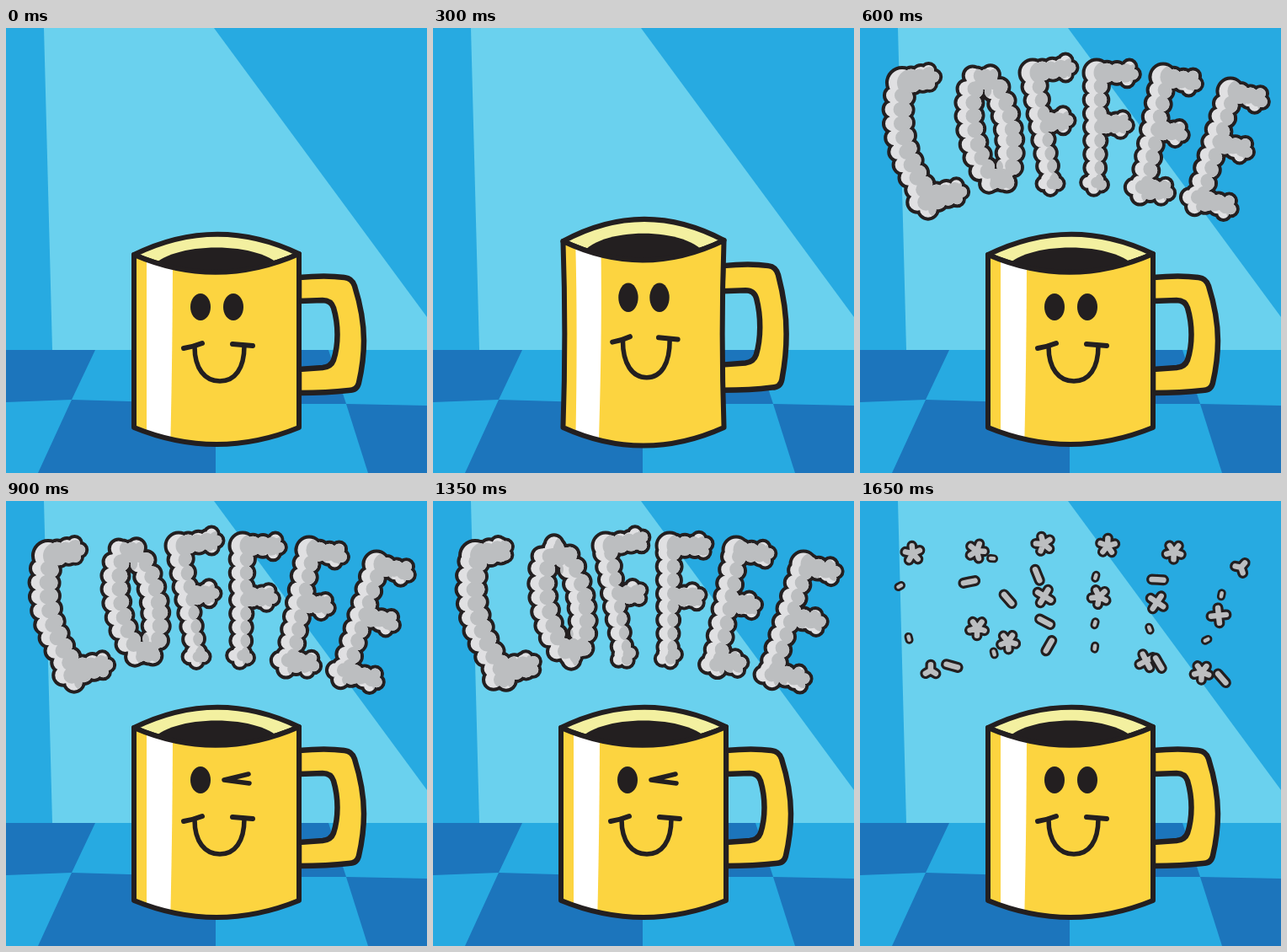
Write an HTML page with a canvas that moves like this. It is 500x528 px and loops after 1800 ms.

```html
<!DOCTYPE html>
<html lang="en">
<head>
<meta charset="utf-8">
<title>Coffee</title>
<style>
html, body { margin: 0; width: 100%; height: 100%; overflow: hidden; background: #27aae1; }
canvas { display: block; width: 500px; height: 528px; }
</style>
</head>
<body>
<canvas id="stage" width="500" height="528"></canvas>
<script>
const ctx = document.getElementById('stage').getContext('2d');
const INK = '#231f20', YELLOW = '#fcd440', CREAM = '#f3f0a0', WHITE = '#fff';
const SKY = '#27aae1', BEAM = '#6ad1ee', TILE = '#1c75bc';
const GREY = '#bcbec0', LIGHT = '#e0e0e2';
const STEP = 150, STEPS = 12, TAU = Math.PI * 2, MID = 0.47;

// Mug stretch: width, height, bulge of the sides
const REST = [1, 1, 0];
const bounce = [REST, [1.2, 0.85, 0.12], [0.975, 1.078, -0.03], [0.985, 1.04, -0.015]];

// Stems run from top to foot; arms leave them at right angles
const word = [
  { top: [50, 65], foot: [80, 202], bow: -32, fat: 16, taper: 0, arms: [30, 0, 33] },
  { ring: [154, 120], rx: 22, ry: 64, tilt: -0.17, fat: 14.5 },
  { top: [205, 53], foot: [226, 182], fat: 13.5, taper: 3, arms: [37, 24, 0] },
  { top: [281, 53], foot: [279, 182], fat: 13.5, taper: 3, arms: [35, 28, 0] },
  { top: [360, 58], foot: [336, 189], fat: 13.5, taper: 0, arms: [31, 26, 22] },
  { top: [440, 75], foot: [402, 202], fat: 13.5, taper: 0, arms: [31, 31, 32] }
];

const lerp = (a, b, t) => a + (b - a) * t;
const fill = (path, color) => { ctx.fillStyle = color; ctx.fill(path); };
const line = (path, width, color = INK) => {
  ctx.strokeStyle = color;
  ctx.lineWidth = width;
  ctx.stroke(path);
};

function poly(color, ...pts) {
  ctx.fillStyle = color;
  ctx.beginPath();
  for (let i = 0; i < pts.length; i += 2) ctx.lineTo(pts[i], pts[i + 1]);
  ctx.fill();
}

function room() {
  poly(SKY, 0, 0, 500, 0, 500, 528, 0, 528);
  poly(BEAM, 45, 0, 247, 0, 500, 343, 500, 382, 55, 382);
  poly(TILE, 0, 382, 106, 382, 78, 441, 0, 444);
  poly(TILE, 249, 382, 383, 382, 404, 446, 249, 446);
  poly(TILE, 78, 441, 249, 446, 249, 528, 38, 528);
  poly(TILE, 404, 446, 500, 448, 500, 528, 430, 528);
}

function cloud(circles, shift) {
  const path = new Path2D(), shade = new Path2D();
  for (const [x, y, r] of circles) {
    path.moveTo(x + r, y);
    path.arc(x, y, r, 0, TAU);
    shade.moveTo(x + shift + r, y);
    shade.arc(x + shift, y, r, 0, TAU);
  }
  line(path, 8);
  fill(path, LIGHT);
  ctx.save();
  ctx.clip(path);
  fill(shade, GREY);
  ctx.restore();
}

function stemAt({ top, foot, bow = 0 }, t) {
  return [lerp(top[0], foot[0], t) + 2 * t * (1 - t) * bow, lerp(top[1], foot[1], t)];
}

function ringAt({ ring: [x, y], rx, ry, tilt }, turn) {
  const u = Math.cos(turn * TAU) * rx, v = Math.sin(turn * TAU) * ry;
  return [x + u * Math.cos(tilt) - v * Math.sin(tilt), y + u * Math.sin(tilt) + v * Math.cos(tilt)];
}

const armAngle = ({ top, foot }) => Math.atan2(top[0] - foot[0], foot[1] - top[1]);
const armRoot = (l, i) => stemAt(l, [0, MID, 1][i]);
const along = ([x, y], angle, d) => [x + Math.cos(angle) * d, y + Math.sin(angle) * d];

// Round bumps on both sides of a curve
function bumps(at, from, to, gap, fat, phase) {
  const out = [], N = 120;
  let walked = -phase * gap, [px, py] = at(from);
  for (let i = 0; i <= N; i++) {
    const [x, y] = at(lerp(from, to, i / N));
    const dx = x - px, dy = y - py, len = Math.hypot(dx, dy);
    walked += len;
    [px, py] = [x, y];
    if (walked < 0 || !len) continue;
    walked -= gap;
    const h = fat(i / N), r = 9, off = (h - r) / len;
    out.push([x, y, h - 3], [x - dy * off, y + dx * off, r], [x + dy * off, y - dx * off, r]);
  }
  return out;
}

function knob(p, angle, r) {
  const tips = [-1.25, 0, 1.25].map(turn => [...along(p, angle + turn, r * 0.8), r * 0.62]);
  return [[...p, r], ...tips];
}

function letter(l, alt) {
  const phase = alt ? 0.5 : 0, gap = 16, sway = alt ? -0.35 : 0.15;
  if (l.ring) return cloud(bumps(t => ringAt(l, t), 0, 1, gap, () => l.fat, phase), 10);
  const angle = armAngle(l), fat = t => l.fat - l.taper * t;
  const circles = bumps(t => stemAt(l, t), 0, 1, gap, fat, phase);
  circles.push([...l.top, l.fat], ...knob(l.foot, angle + Math.PI / 2 + sway, fat(1)));
  l.arms.forEach((len, i) => {
    if (!len) return;
    const root = armRoot(l, i);
    circles.push(...bumps(t => along(root, angle, t * len), 0, 1, 12, () => l.fat - 2, phase));
    circles.push(...knob(along(root, angle, len), angle + sway, 10.5));
  });
  cloud(circles, 10);
}

function burst() {
  const circles = [];
  for (let i = 0; i < 14; i++) circles.push([...ringAt({ ring: [250, 152], rx: 128, ry: 36, tilt: 0 }, i / 14), 31]);
  for (let x = 150; x <= 350; x += 25) circles.push([x, 152, 36]);
  for (let y = 205; y < 265; y += 18) {
    for (const d of [-35, 0, 35]) circles.push([250 + d, y, d ? 20 : 26]);
  }
  cloud(circles, 12);
}

function puff([x, y], lobes, turn, scale) {
  const path = new Path2D(), reach = lobes > 3 ? 9 : lobes > 1 ? 7 : 4;
  for (let i = 0; i < lobes; i++) {
    const a = turn + i / lobes * TAU;
    path.moveTo(0, 0);
    path.lineTo(Math.cos(a) * reach, Math.sin(a) * reach);
  }
  ctx.save();
  ctx.translate(x, y);
  ctx.scale(scale, scale);
  line(path, lobes > 1 ? 13 : 10);
  line(path, lobes > 1 ? 6.5 : 4.5, GREY);
  ctx.restore();
}

// Large puffs stay where strokes met, small ones between them
function puffs(scale) {
  let seed = 7;
  const rand = () => (seed = seed * 16807 % 2147483647) / 2147483647;
  const big = p => puff(p, 3 + Math.floor(rand() * 3), rand() * TAU, scale);
  const small = p => puff(p, 1 + Math.floor(rand() * 2), rand() * TAU, scale);
  for (const l of word) {
    if (l.ring) {
      for (let i = 0; i < 7; i++) (i % 2 ? big : small)(ringAt(l, i / 7));
      continue;
    }
    const angle = armAngle(l);
    small(stemAt(l, 0.27));
    small(stemAt(l, 0.7));
    l.arms.forEach((len, i) => {
      if (len) big(along(armRoot(l, i), angle, i ? 4 : 13));
    });
    const low = l.arms[2];
    if (low) small(along(l.foot, angle, low - 3));
    else small(stemAt(l, 0.92));
  }
}

function mug([sx, sy, bulge], wink, steam) {
  const bend = y => sx + bulge * Math.sin(Math.PI * Math.min(1, Math.max(0, (474 - y) / 205)));
  // The handle keeps its width and rides on the side of the body
  const warp = (x, y) => {
    const over = Math.max(0, x - 348);
    return [250 + (x - over - 250) * bend(y) + over, 474 - (474 - y) * sy];
  };
  const shape = d => new Path2D(d.replace(/([\d.]+) ([\d.]+)/g, (_, x, y) => warp(+x, +y).join(' ')));

  const handle = shape('M348 296C368 294 388 294 402 296Q411 297 414 306C420 325 425 350 425 371' +
    'C425 390 422 408 419 421Q417 430 407 430C390 432 368 433 348 433' +
    'L348 405L376 403Q386 402 389 394C395 376 395 352 389 332Q386 323 376 323L348 324Z');
  fill(handle, YELLOW);
  line(handle, 6.5);

  const mouth = shape('M152 269Q250 221 348 268Q250 311 152 269Z');
  fill(mouth, CREAM);
  ctx.save();
  ctx.clip(mouth);
  fill(shape('M172 286C192 252 308 252 328 286L322 320L178 320Z'), INK);
  ctx.restore();
  line(mouth, 6);
  if (steam) burst();

  const body = shape('M152 269Q250 311 348 268C348 337 348 405 348 474Q250 514 152 474C152 405 152 337 152 269Z');
  fill(body, YELLOW);
  ctx.save();
  ctx.clip(body);
  fill(shape('M167 265L198 265C198 340 197 420 195 505L167 505C167 420 167 340 167 265Z'), WHITE);
  ctx.restore();
  line(body, 6);

  for (const x of wink ? [231] : [231, 270]) {
    const eye = new Path2D();
    eye.ellipse(...warp(x, 331), 12 * sx, 16 * sy, 0, 0, TAU);
    fill(eye, INK);
  }
  if (wink) line(shape('M288 324L259 331L289 335'), 5.5);
  line(shape('M224 378C224 404 236 419 254 419C272 419 283 404 283 377'), 5.5);
  line(shape('M211 380Q223 378 233 374M269 375L293 377'), 6);
}

function draw(step) {
  const text = step >= 4 && step < 10;
  ctx.lineJoin = ctx.lineCap = 'round';
  room();
  mug(bounce[step] || REST, step >= 6 && step < 10, step === 3);
  if (text) word.forEach(l => letter(l, step % 2 === 1));
  if (step === 10) puffs(1.45);
  if (step === 11) puffs(1);
}

const start = performance.now();
let shown = -1;
function tick() {
  const step = Math.floor((performance.now() - start) / STEP) % STEPS;
  if (step !== shown) draw(shown = step);
  requestAnimationFrame(tick);
}
tick();
</script>
</body>
</html>
```
